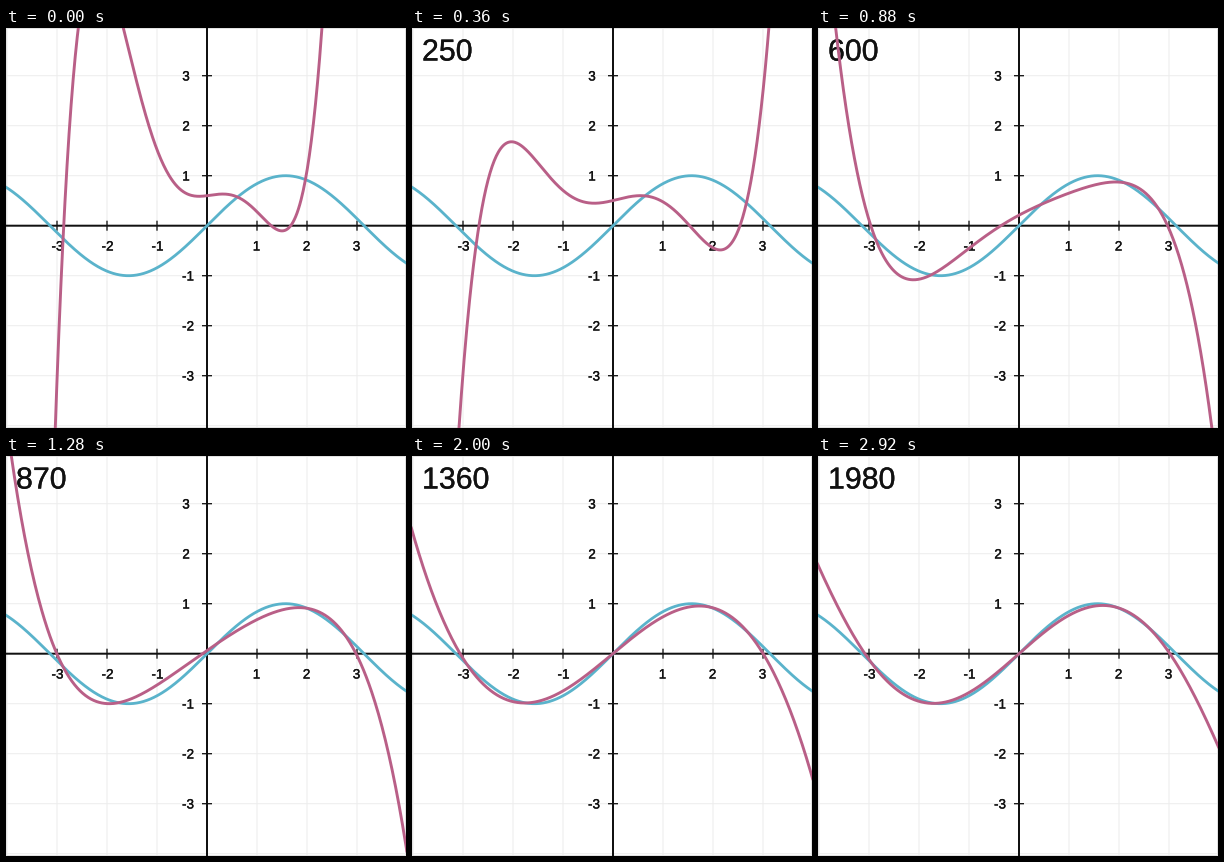
A matplotlib script for the animation above (2.96 s loop, 400 by 400 pixels).

```python
import math

import matplotlib.patheffects as pe
import matplotlib.pyplot as plt
import numpy as np
from matplotlib.animation import FuncAnimation

SIZE, DPI = 400, 100
FRAMES, INTERVAL = 74, 40
LAST_STEP = 1980
X0, Y0, UNIT = 201, 197.7, 50

BLUE, PINK, GRID, INK = "#5ab3cb", "#b95f87", "#ededed", "#111111"


def quintic(x, t):
    """Fit to sin(x): a settled curve plus error modes that die out at t."""
    u = min(t / 22, 1)
    slow_odd = 0.765 * math.exp(1.2 - math.hypot(1.2, 0.07 * t))
    slow_even = 0.6 * math.exp(-(t / 21.5) ** 2)
    mid_odd = 1.099 * (1 - u) ** 1.3
    mid_even = 0.534 * (1 - u ** 1.5)
    fast = math.exp(-t / 2)

    settled = 0.895 * x - 0.005 * x**2 - 0.116 * x**3 + 0.00216 * x**5
    return (settled
            - slow_odd * (x - 0.4 * x**3 + 0.034 * x**5)
            + slow_even * (1 - 0.56 * x**2 + 0.054 * x**4)
            - mid_odd * (x**3 - 0.133 * x**5)
            + mid_even * (x**2 - 0.123 * x**4)
            + fast * (0.14 * x**4 + 0.035 * x**5))


def pt(px):
    return px * 72 / DPI


def px_x(x):
    return X0 + UNIT * x


def px_y(y):
    return Y0 - UNIT * y


plt.rcParams["font.family"] = "Liberation Sans"
fig = plt.figure(figsize=(SIZE / DPI, SIZE / DPI), dpi=DPI, facecolor="white")
ax = fig.add_axes([0, 0, 1, 1])
ax.set_xlim(0, SIZE)
ax.set_ylim(SIZE, 0)
ax.axis("off")


def line(xs, ys, color, width, z):
    return ax.plot(xs, ys, color=color, lw=pt(width), zorder=z, snap=False,
                   solid_capstyle="butt")[0]


def write(x, y, text, size, **align):
    heavier = [pe.withStroke(linewidth=pt(0.35), foreground=INK)]
    return ax.text(x, y, text, size=pt(size), color=INK, zorder=4,
                   path_effects=heavier, **align)


def label(x, y, n):
    write(x, y, str(n), 13.5, ha="center", va="center_baseline")


for n in range(-4, 4):
    line([px_x(n)] * 2, [0, SIZE], GRID, 1, 1)
    line([0, SIZE], [px_y(n)] * 2, GRID, 1, 1)
line([0.5, 399.5, 399.5, 0.5, 0.5], [0.5, 0.5, 399.5, 399.5, 0.5],
     "#e2e2e2", 1, 1)

line([X0, X0], [0, SIZE], INK, 2, 3)
line([0, SIZE], [Y0, Y0], INK, 2, 3)
for n in (-3, -2, -1, 1, 2, 3):
    line([px_x(n)] * 2, [Y0 - 5, Y0 + 5], INK, 1.3, 3)
    line([X0 - 5, X0 + 5], [px_y(n)] * 2, INK, 1.3, 3)
    label(px_x(n) + (0.5 if n < 0 else -0.5), Y0 + 19.3, n)
    label(182 if n < 0 else 180, px_y(n) - 0.7, n)

xs = np.linspace(-4.1, 4.1, 600)
line(px_x(xs), px_y(np.sin(xs)), BLUE, 2.8, 5)
fit = line([], [], PINK, 2.9, 6)
counter = write(10, 32.5, "", 30.3, ha="left", va="baseline")


def draw(i):
    fit.set_data(px_x(xs), px_y(quintic(xs, i)))
    step = math.ceil(i * LAST_STEP / (FRAMES - 1) / 10) * 10
    counter.set_text(str(step) if step else "")
    return fit, counter


anim = FuncAnimation(fig, draw, frames=FRAMES, interval=INTERVAL,
                     repeat=True, repeat_delay=0)
plt.show()
```
